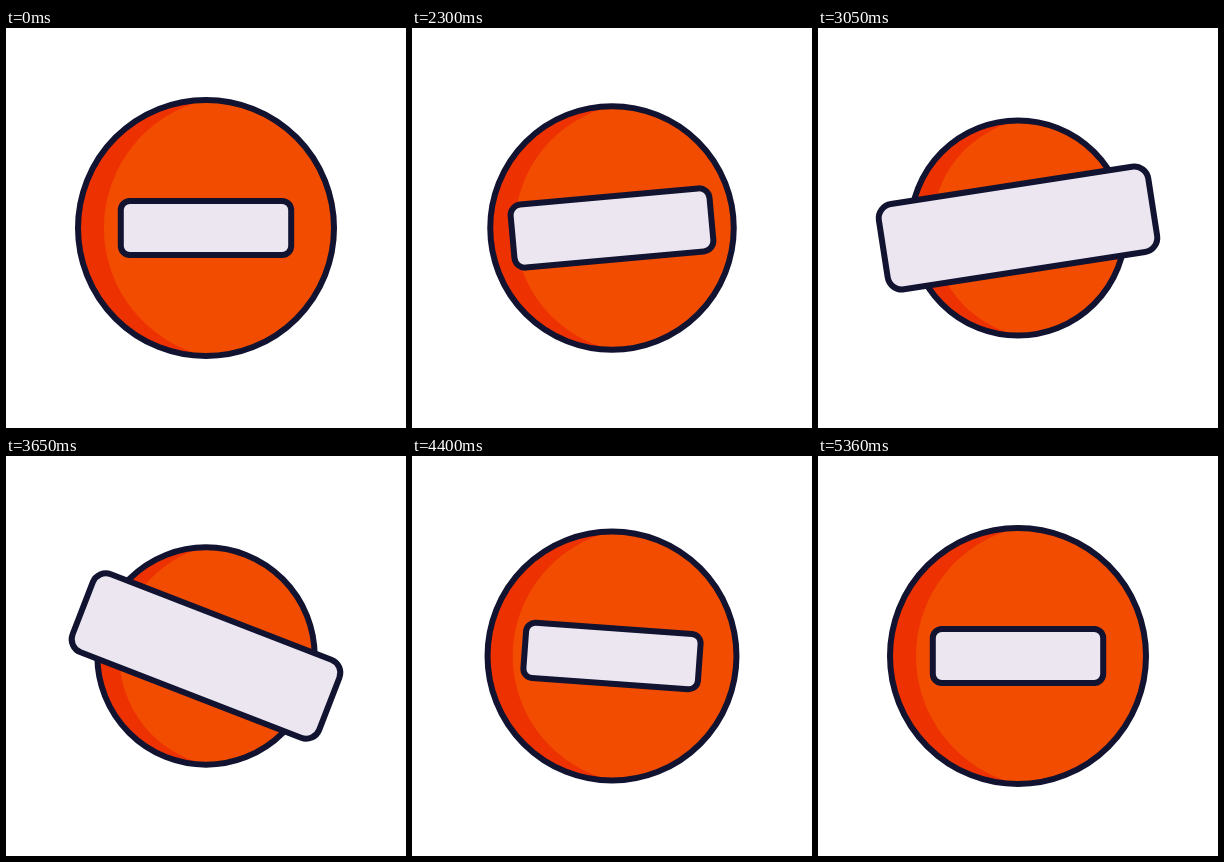
Recreate the animation shown at these times as an HTML page without scripts. Size 400x400 px, loop 5390 ms.

```html
<!DOCTYPE html>
<html lang="en">
<head>
<meta charset="utf-8">
<title>No entry</title>
<style>
  html, body { margin: 0; width: 100%; height: 100%; overflow: hidden; background: #fff; }
  svg { display: block; width: 100vw; height: 100vh; }

  .disc, .bar { animation: 5390ms cubic-bezier(.333, 0, .667, 1) infinite; }
  .disc { animation-name: shrink; }
  .bar { animation-name: grow, swing; }

  .outline { stroke: #121331; stroke-width: 6; vector-effect: non-scaling-stroke; }

  @keyframes shrink {
    0%, 37.11% { scale: 1; }
    52.32%, 64.38% { scale: .84; }
    87.85%, 100% { scale: 1; }
  }
  @keyframes grow {
    0%, 37.11% { scale: 1; }
    52.9%, 64% { scale: 1.6; }
    86.46% { scale: .95; }
    98.7%, 100% { scale: 1; }
  }
  @keyframes swing {
    0% { rotate: 0deg; }
    37.11% { rotate: 0deg; animation-timing-function: cubic-bezier(.33, .33, .67, .8); }
    52.88% { rotate: -13.5deg; }
    69.2%, 73.56% { rotate: 22deg; }
    87.2% { rotate: -6deg; }
    98.33%, 100% { rotate: 0deg; }
  }
</style>
</head>
<body>
<svg viewBox="0 0 400 400">
  <g transform="translate(200 200)">
    <g class="disc">
      <circle r="128" fill="#f24c00"/>
      <path d="M0-128A128 128 0 0 0 0 128A131.3 131.3 0 0 1 0-128Z" fill="#ed3100"/>
      <circle class="outline" r="128" fill="none"/>
    </g>
    <g class="bar">
      <rect class="outline" x="-85.2" y="-27" width="170.4" height="54" rx="9" fill="#ebe6ef"/>
    </g>
  </g>
</svg>
</body>
</html>
```
